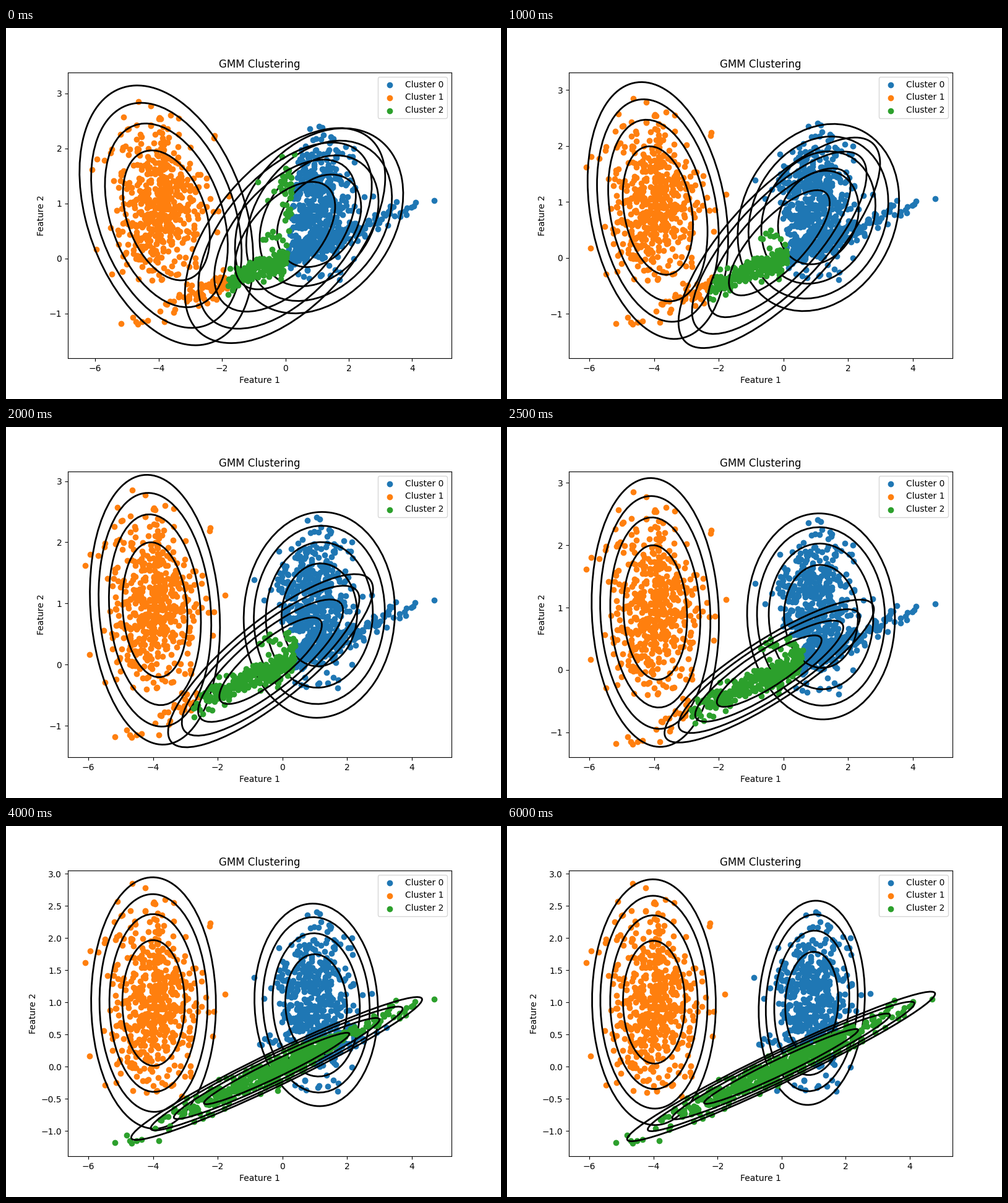
These frames come from a looping animation (800 px wide and 600 px high, 6500 ms). A matplotlib script:

```python
import numpy as np
import matplotlib.pyplot as plt
from matplotlib.animation import FuncAnimation
from matplotlib.patches import Ellipse

FRAMES = 13
INTERVAL = 500
COLORS = ["tab:blue", "tab:orange", "tab:green"]

# Seeds for the first assignment: each point joins the nearest one
SEEDS = np.array([[0.631, -0.092], [-3.0, 0.185], [-0.57, 0.1]])

# First mixture: weight, mean, (sigma x, sigma y, correlation)
FIRST = [
    (0.397, (1.063, 0.685), (0.938, 0.595, 0.29)),
    (0.3835, (-3.755, 0.784), (0.969, 0.835, -0.335)),
    (0.2195, (-0.010, 0.416), (1.117, 0.691, 0.54)),
]


def make_data(n=500):
    np.random.seed(0)
    shear = np.array([[0.0, -0.1], [1.7, 0.4]])
    streak = np.random.randn(n, 2) @ shear
    left = 0.7 * np.random.randn(n, 2) + [-4, 1]
    right = np.random.randn(n, 2)
    right = right * 0.574 / right.std() + 1
    return np.vstack([streak, left, right])


def covariance(sx, sy, r):
    return np.array([[sx * sx, r * sx * sy], [r * sx * sy, sy * sy]])


def e_step(data, weights, means, covs):
    dens = []
    for w, mean, cov in zip(weights, means, covs):
        d = data - mean
        dist = np.sum(d @ np.linalg.inv(cov) * d, axis=1)
        dens.append(w * np.exp(-dist / 2) / np.sqrt(np.linalg.det(cov)))
    dens = np.array(dens) + 1e-300
    return dens / dens.sum(axis=0)


def m_step(data, resp):
    total = resp.sum(axis=1)
    means = resp @ data / total[:, None]
    covs = []
    for r, mean, t in zip(resp, means, total):
        d = data - mean
        covs.append((r[:, None] * d).T @ d / t)
    return total / len(data), means, np.array(covs)


def run_em(data):
    gaps = np.linalg.norm(data[:, None] - SEEDS, axis=2)
    weights, means, shapes = zip(*FIRST)
    covs = [covariance(*s) for s in shapes]
    steps = [(gaps.argmin(axis=1), means, covs)]
    while len(steps) < FRAMES:
        resp = e_step(data, weights, means, covs)
        weights, means, covs = m_step(data, resp)
        steps.append((resp.argmax(axis=0), means, covs))
    return steps


def add_ellipses(mean, cov):
    values, vectors = np.linalg.eigh(cov)
    angle = np.degrees(np.arctan2(vectors[1, 1], vectors[0, 1]))
    for level in range(1, 5):
        minor, major = 2 * np.sqrt(2 * level * values)
        ax.add_patch(Ellipse(mean, major, minor, angle=angle, fill=False,
                             edgecolor="black", linewidth=2))


def draw(i):
    ax.clear()
    labels, means, covs = steps[i]
    for k, color in enumerate(COLORS):
        pts = data[labels == k]
        ax.scatter(pts[:, 0], pts[:, 1], color=color, label=f"Cluster {k}")
        add_ellipses(means[k], covs[k])
    ax.set_title("GMM Clustering")
    ax.set_xlabel("Feature 1")
    ax.set_ylabel("Feature 2")
    ax.legend(loc="upper right")


data = make_data()
steps = run_em(data)
fig, ax = plt.subplots(figsize=(8, 6), dpi=100)
anim = FuncAnimation(fig, draw, frames=FRAMES, interval=INTERVAL, repeat=True)
plt.show()
```
